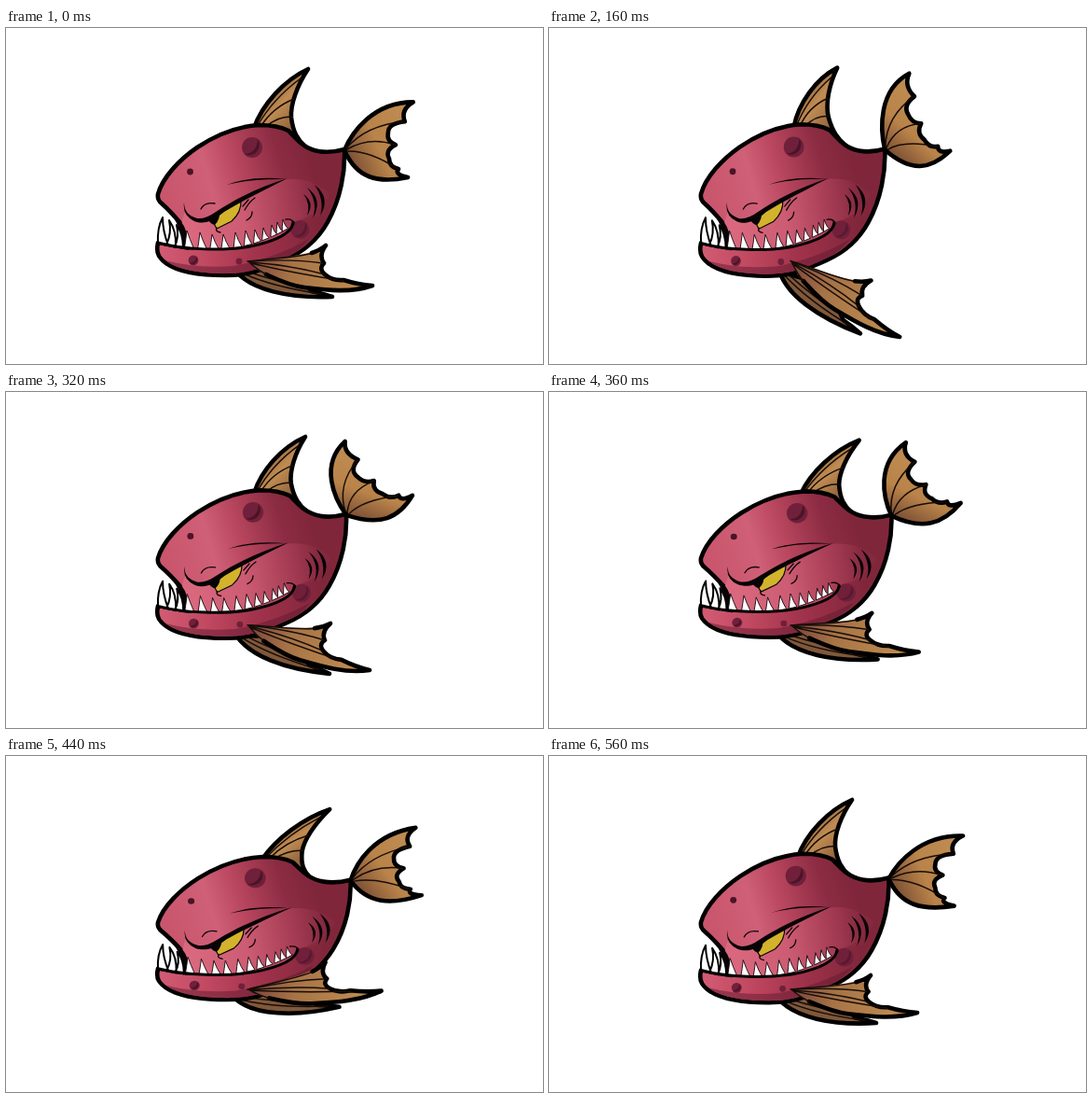
These frames come from a looping animation (576x360 px, 0.6 s). An HTML page:

```html
<!DOCTYPE html>
<html lang="en">
<head>
<meta charset="utf-8">
<title>Swimming fish</title>
<style>
html, body { margin: 0; width: 100%; height: 100%; overflow: hidden; background: #fff; }
svg { display: block; }
path, circle { vector-effect: non-scaling-stroke; }
.edge { stroke: #000; stroke-width: 4.6; stroke-linejoin: round; stroke-linecap: round; }
.ray { fill: none; stroke: #170d08; stroke-width: 1.5; stroke-linecap: round; }
.ink { fill: #080305; }
.line { fill: none; stroke: #0c0406; stroke-width: 1.3; stroke-linecap: round; }
.spot { fill: #70203a; }
.dark { fill: #4b1428; }
</style>
</head>
<body>
<svg width="576" height="360">
  <defs>
    <linearGradient id="skin" gradientUnits="userSpaceOnUse" x1="172" y1="172" x2="322" y2="128">
      <stop offset="0" stop-color="#c9566d"/><stop offset=".3" stop-color="#cf6077"/>
      <stop offset=".5" stop-color="#b9475f"/><stop offset=".8" stop-color="#8c2c43"/>
      <stop offset="1" stop-color="#80263b"/>
    </linearGradient>
    <linearGradient id="cheek" gradientUnits="userSpaceOnUse" x1="200" y1="210" x2="336" y2="188">
      <stop offset="0" stop-color="#d9687e"/><stop offset=".4" stop-color="#cc5c73"/>
      <stop offset=".75" stop-color="#a63d55"/><stop offset="1" stop-color="#852940"/>
    </linearGradient>
    <linearGradient id="chin" gradientUnits="userSpaceOnUse" x1="164" y1="238" x2="335" y2="232">
      <stop offset="0" stop-color="#d25c74"/><stop offset=".3" stop-color="#c04860"/>
      <stop offset=".6" stop-color="#a2334c"/><stop offset="1" stop-color="#80263b"/>
    </linearGradient>
    <linearGradient id="dorsalFill" gradientUnits="userSpaceOnUse" x1="272" y1="70" x2="308" y2="104">
      <stop offset="0" stop-color="#8a5c38"/><stop offset=".5" stop-color="#c08c52"/><stop offset="1" stop-color="#94663f"/>
    </linearGradient>
    <linearGradient id="tailFill" gradientUnits="userSpaceOnUse" x1="366" y1="134" x2="428" y2="108">
      <stop offset="0" stop-color="#7c5034"/><stop offset=".5" stop-color="#b98349"/><stop offset="1" stop-color="#bd8a50"/>
    </linearGradient>
    <linearGradient id="finFill" gradientUnits="userSpaceOnUse" x1="262" y1="250" x2="370" y2="272">
      <stop offset="0" stop-color="#7b453c"/><stop offset=".4" stop-color="#a67346"/><stop offset="1" stop-color="#bd8a50"/>
    </linearGradient>
  </defs>

  <g id="back">
    <path class="edge" fill="#80583a" d="M247 261C263 280 302 290 350 288Q338 284 328 282L322 276L290 256Z"/>
    <path class="ray" d="M252 262Q284 277 338 285M256 260Q290 272 326 278"/>
  </g>

  <g id="dorsal">
    <path class="edge" fill="url(#dorsalFill)" d="M266 107C275 82 298 56 324 44C312 62 305 82 306 96C308 112 313 120 321 127L300 116Z"/>
    <path class="ray" d="M269 106Q286 76 316 54M273 106Q286 85 309 76M279 106Q290 95 306 95"/>
  </g>

  <g id="tail">
    <path class="edge" fill="url(#tailFill)" d="M363 131C371 112 394 79 437 79Q423 87 428 100Q410 102 410 112Q408 121 418 125Q406 131 411 140Q411 149 421 151Q416 157 431 160C398 167 376 161 363 131Z"/>
    <path class="ray" d="M365 129Q386 104 427 100M366 130Q390 116 417 125M366 132Q390 131 420 151"/>
  </g>

  <g id="body">
    <path class="edge" fill="url(#skin)" d="M163 178C168 160 186 141 205 128C229 112 252 105 272 104C286 104 295 106 303 110C312 119 319 129 335 132C346 134 356 132 363 130C364 154 359 183 345 208C335 226 321 239 300 248C275 259 262 265 235 265C202 265 174 260 164 244Q161 239 163 230Q175 235 194 237Q193 222 187 209Q176 196 167 188Q162 184 163 178Z"/>
    <path fill="url(#cheek)" d="M193 194Q199 206 214 206C236 192 262 176 301 162Q330 160 347 178Q340 198 309 208C306 220 292 229 262 234Q230 238 194 236Q194 222 188 210Q190 202 193 194Z"/>
    <path fill="url(#chin)" d="M165 232C190 239 235 240 262 235C291 229 307 220 309 208Q326 204 345 200C336 222 321 237 300 246C275 257 262 263 235 263C202 263 175 257 166 243Z"/>
    <path fill="#621a30" opacity=".5" d="M171 249Q205 258 244 255Q289 247 325 226Q315 239 300 246C275 257 262 263 235 263Q187 263 171 249Z"/>

    <circle class="spot" cx="264" cy="128" r="11"/>
    <path class="dark" d="M256 135Q269 134 270 119A11 11 0 0 1 256 135Z"/>
    <circle class="dark" cx="197.500" cy="154" r="3.400"/>
    <circle class="spot" cx="315.500" cy="216" r="10"/>
    <path class="dark" opacity=".6" d="M309 223Q321 222 321 208A10 10 0 0 1 309 223Z"/>
    <circle class="spot" cx="201" cy="249" r="5.400"/>
    <path class="dark" d="M197 252Q204 251 204 245A5 5 0 0 1 197 252Z"/>
    <circle class="spot" cx="250" cy="250" r="3.400"/>

    <path class="ink" d="M175 194Q190 206 194 220L196 238L184 235Q190 224 184 211Z"/>
    <g id="teeth" fill="#fff" stroke="#160509" stroke-width=".9" stroke-linejoin="round"></g>
    <path fill="#fff" stroke="#000" stroke-width="2" stroke-linejoin="round" d="M181 234Q186 224 183 211Q190 220 190 236ZM172 232Q178 220 175 206Q183 217 182 235ZM163 231Q162 214 168 203Q168 217 174 233Z"/>
    <path fill="none" stroke="#000" stroke-width="3" stroke-linecap="round" d="M163 230C190 238 235 239 262 234C291 228 307 219 308 208"/>
    <path class="line" stroke-width="2" d="M300 205Q308 204 309 210"/>

    <path fill="#d3b32c" stroke="#0c0406" stroke-width="1.200" d="M220 204L229 196L252 184Q253 197 242 207L226 215Z"/>
    <path class="ink" d="M216 204L229 196Q230 205 224 211Q219 210 216 204Z"/>
    <path class="ink" d="M191 187Q191 200 205 204Q214 205 225 197C248 182 273 170 302 161C276 174 254 185 234 197C222 207 213 211 202 207Q189 201 191 187Z"/>
    <path class="line" d="M209 194Q213 186 224 188M226 214Q224 218 230 219M260 184L254 191M267 182Q261 186 256 195M264 197Q264 203 258 206"/>
    <path class="ink" d="M237 168Q263 158 300 162Q264 161 237 168Z"/>
    <path class="ink" d="M319 178Q332 187 323 201Q327 188 319 178ZM323 171Q341 184 329 204Q335 186 323 171ZM331 168Q349 182 337 201Q342 184 331 168Z"/>
  </g>

  <g id="fin">
    <path fill="url(#finFill)" d="M259 250C290 246 325 245 343 233Q335 244 341 252Q335 258 342 264Q350 271 362 270Q378 275 393 276C370 284 345 281 320 278C295 274 270 262 259 250Z"/>
    <path class="ray" stroke-width="2" d="M259 250C290 246 318 246 332 240"/>
    <path class="edge" fill="none" stroke-width="4" d="M328 241Q337 238 343 233Q335 244 341 252Q335 258 342 264Q350 271 362 270Q378 275 393 276C370 284 345 281 320 278C304 276 290 269 279 264"/>
    <path class="ray" d="M279 264Q268 258 260 250M262 250Q305 247 340 252M262 251Q305 254 342 264M263 252Q305 262 362 271"/>
  </g>
</svg>
<script>
const LOOP = 600, STEP = 40;
const KEYS = [0, 80, 240, 320, 400, 480, 560];

// One value per key time.
const POSE = {
  sx: [1, .997, .985, 1.01, 1.03, 1.03, 1.007],
  sy: [1, 1.004, 1.005, .985, .957, .952, .99],
  baseX: [267, 266, 262, 267, 275, 276, 268],
  crestX: [324, 317, 308, 321, 343, 346, 325],
  crestY: [44, 44, 43, 48, 55, 57, 47],
  upAngle: [35, 46, 94, 91, 62, 21, 30],
  upLen: [90, 88, 83, 79, 83, 96, 92],
  lowAngle: [-23, -21, 18, 16.5, 1.5, -22.6, -22.5],
  lowLen: [74, 70, 72, 74, 77, 78, 76],
  finTopX: [343, 345, 346, 348, 344, 342, 345],
  finTopY: [233, 261, 265, 248, 227, 220, 235],
  finTipX: [393, 380, 380, 390, 402, 401, 395],
  finTipY: [276, 317, 323, 298, 261, 250, 275],
  backX: [351, 338, 339, 348, 358, 357, 352],
  backY: [288, 317, 322, 302, 273, 270, 286]
};

const el = id => document.getElementById(id);

// Periodic cubic through the key values.
function sample(vals, t) {
  const n = KEYS.length;
  const time = i => KEYS[(i + n) % n] + LOOP * Math.floor(i / n);
  const val = i => vals[(i + n) % n];
  const slope = i => (val(i + 1) - val(i)) / (time(i + 1) - time(i));
  const tangent = i => {
    const a = time(i) - time(i - 1), b = time(i + 1) - time(i);
    return (slope(i - 1) * b + slope(i) * a) / (a + b);
  };
  let i = n - 1;
  while (KEYS[i] > t) i--;
  const h = time(i + 1) - time(i), u = (t - time(i)) / h, v = 1 - u;
  return val(i) * v * v * (1 + 2 * u) + val(i + 1) * u * u * (3 - 2 * u)
    + h * u * v * (tangent(i) * v - tangent(i + 1) * u);
}

// Frame spanned by an origin and two points.
const frame = (o, a, b) =>
  new DOMMatrix([a[0] - o[0], a[1] - o[1], b[0] - o[0], b[1] - o[1], o[0], o[1]]);

const polar = (o, deg, len) => {
  const r = deg * Math.PI / 180;
  return [o[0] + len * Math.cos(r), o[1] - len * Math.sin(r)];
};

const turn = (o, p) => frame(o, p, [o[0] - p[1] + o[1], o[1] + p[0] - o[0]]);

const REST = {
  dorsal: frame([267, 104], [324, 44], [320, 126]).inverse(),
  tail: frame([363, 131], [437, 79], [431, 160]).inverse(),
  fin: frame([260, 250], [343, 233], [393, 276]).inverse(),
  back: turn([247, 262], [351, 288]).inverse()
};

function place(id, m) {
  if (REST[id]) m = m.multiply(REST[id]);
  el(id).setAttribute('transform', `matrix(${[m.a, m.b, m.c, m.d, m.e, m.f].join(' ')})`);
}

function draw(t) {
  const p = {};
  for (const k in POSE) p[k] = sample(POSE[k], t);
  const onBody = (x, y) => [163 + (x - 163) * p.sx, 185 + (y - 185) * p.sy];
  const root = onBody(363, 131);

  place('body', new DOMMatrix([p.sx, 0, 0, p.sy, 163 * (1 - p.sx), 185 * (1 - p.sy)]));
  place('dorsal', frame([p.baseX, onBody(267, 104)[1]], [p.crestX, p.crestY], onBody(320, 126)));
  place('tail', frame(root, polar(root, p.upAngle, p.upLen), polar(root, p.lowAngle, p.lowLen)));
  place('fin', frame([260, 250], [p.finTopX, p.finTopY], [p.finTipX, p.finTipY]));
  place('back', turn([247, 262], [p.backX, p.backY]));
}

function addTeeth() {
  const tips = [[194, 217], [208, 219], [221, 221], [233, 221], [246, 219], [257, 217],
    [267, 216], [276, 214], [285, 211], [291, 208], [297, 205]];
  const gum = x => 237 - 25 * Math.max(0, (x - 225) / 82) ** 2;
  el('teeth').innerHTML = tips.map(([x, y], i) => {
    const w = 5.2 - i * .2, c = x + 2.5, l = c - w, r = c + w;
    return `<path d="M${l} ${gum(l)}Q${x - 1} ${y + 9} ${x} ${y}Q${x + 3} ${y + 9} ${r} ${gum(r)}Z"/>`;
  }).join('');
}

function tick() {
  draw(Math.floor(performance.now() % LOOP / STEP) * STEP);
  requestAnimationFrame(tick);
}

addTeeth();
tick();
</script>
</body>
</html>
```
